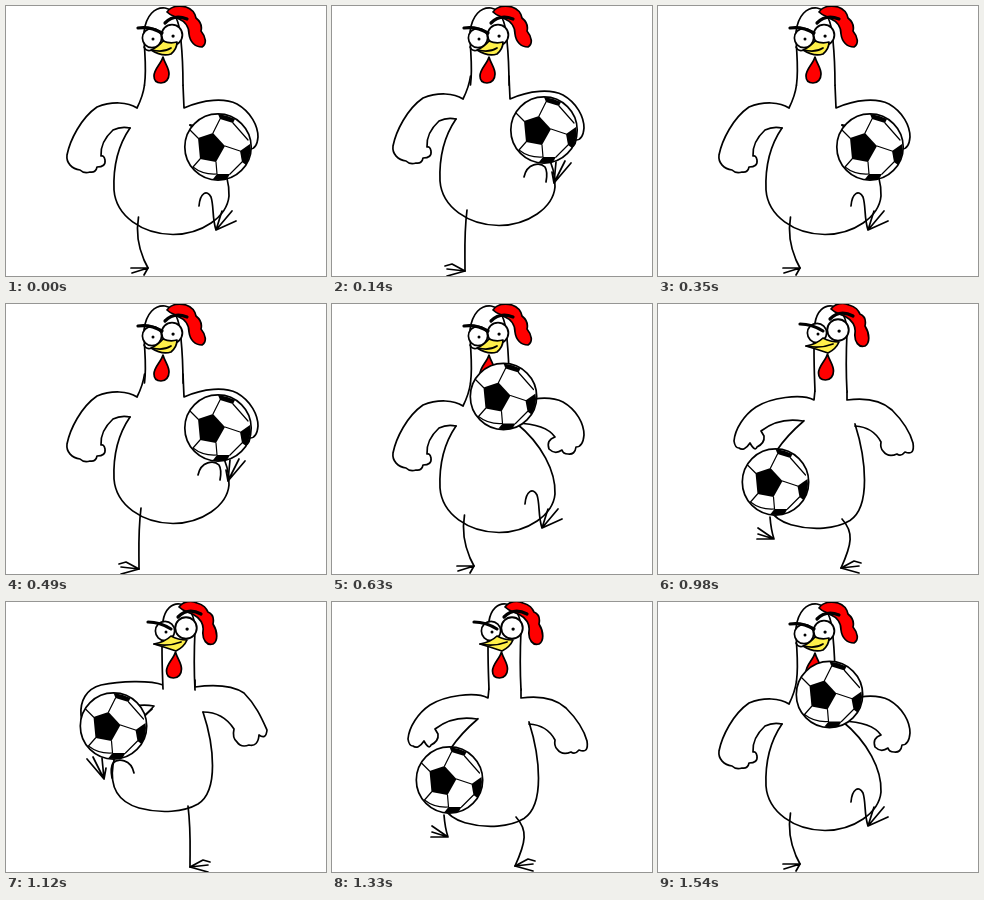
Animation, 320 px wide and 270 px high, one loop 1610 ms. Source, as an HTML page without scripts:

```html
<!DOCTYPE html>
<html lang="en">
<head>
<meta charset="utf-8">
<title>Chicken juggling a ball</title>
<style>
  html, body { margin: 0; width: 100%; height: 100%; overflow: hidden; background: #fff; }
  svg { display: block; width: 100vw; height: 100vh; }
  .ink { fill: none; stroke: #000; stroke-width: 1.7; stroke-linecap: round; stroke-linejoin: round; }
  .white { fill: #fff; }
  .red { fill: #f00; }
  .yellow { fill: #fff04a; }
  .brow { stroke-width: 3.2; }
  .seam { stroke-width: 1.2; }
  .dot { fill: #000; stroke: none; }
</style>
</head>
<body>
<svg viewBox="0 0 320 270">
  <defs>
    <g id="eye">
      <circle class="ink white" r="9.6"/>
      <circle class="dot" cx="1" cy="1" r="1.5"/>
    </g>
    <path id="wattle" class="ink red" d="M1 0C-1 7-8 12-8 19C-8 24-5 26 -1 26C4 26 7 22 7 17C7 11 3 7 1 0Z"/>

    <g id="headA" class="ink">
      <path class="white" d="M138.500 79C141 60 138 46 138 26C140 9 149 1 159 2C170 4 174 20 175 35C177 55 177 66 177 79"/>
      <path class="red" d="M161 6C165 0 173-1 180 1C186 3 189 7 190 12C195 16 196 21 195 25C200 31 201 38 196 41C189 41 184 36 183 28C183 20 178 15 173 13C169 10 165 10 161 6Z"/>
      <use href="#eye" x="146" y="32"/>
      <use href="#eye" transform="translate(166 29) scale(1.08)"/>
      <path class="brow" d="M132 22Q144 20 156 27M159 17Q168 8 181 13"/>
      <use href="#wattle" x="156" y="51"/>
      <path class="yellow" d="M145 44Q152 41 157 35Q164 38 171 36Q171 43 165 48Q156 51 145 44Z"/>
      <path d="M138 41Q140 46 146 44Q157 47 165 42"/>
    </g>
    <g id="bodyA" class="ink">
      <path d="M138.500 79Q137 90 131 102C122 96 106 95 91 101C75 112 64 134 61 149C60 157 66 163 74 164Q78 168 84 166Q90 167 91 161Q100 161 99 154Q98 149 95 150Q94 136 107 124Q115 120 124 122"/>
      <path d="M124 122C113 138 107 160 108 184C110 210 136 228 167 228.500C196 228 221 211 223 190C224 168 210 140 184 119"/>
      <path d="M177 79Q177.500 90 178 102C198 93 219 92 231 98C245 106 252 120 252 131Q251 143 244 143Q243 151 236 150Q231 150 230 146Q223 151 217 145Q214 136 223 133Q214 120 184 119"/>
    </g>

    <g id="headB" class="ink">
      <path class="white" d="M157 87C156 60 155 42 157 19C159 7 166 1 174 2C184 4 189 15 189 28C188 50 188 70 189 88"/>
      <path class="red" d="M173 5C177-1 186-2 191 1C198 3 200 6 202 10C207 12 208 17 207 22C212 30 212 39 207 42C201 44 196 38 197 29C198 22 194 16 188 13C183 10 178 10 173 5Z"/>
      <use href="#eye" x="159" y="29"/>
      <use href="#eye" transform="translate(180 26) scale(1.12)"/>
      <path class="brow" d="M142 20Q154 20 165 27M172 15Q182 5 195 12"/>
      <use href="#wattle" x="168.500" y="50"/>
      <path class="yellow" d="M148 42Q159 40 165 34Q172 38 181 38Q178 45 170 49Q158 45 148 42Z"/>
      <path d="M148 42Q162 45 175 40"/>
    </g>
    <g id="trunkB" class="ink">
      <path d="M146 116C124 134 110 152 107 172C103 198 116 210 133 215C155 221 178 219 192 211C213 198 208 152 197 119"/>
    </g>
    <g id="armsUp" class="ink">
      <path d="M157 86V92C144 87 114 88 95 92C80 96 74 108 75 122Q76 133 80 138Q88 142 93 133Q96 138 100 131Q120 108 148 113L136 126"/>
      <path d="M189 87V94C204 92 224 91 238 100C250 112 256 126 261 137Q260 147 253 142Q252 154 243 152Q235 155 231 149Q226 145 228 136Q217 119 197 119"/>
    </g>
    <g id="armsDown" class="ink">
      <path d="M157 86L156 96C143 89 112 94 98 103C86 111 77 125 76 137Q77 144 81 144Q86 148 92 139Q97 148 99 143Q107 139 106 132L103 127Q121 113 145 117"/>
      <path d="M189 87V96C204 94 222 95 234 106C246 118 252 128 255 139Q257 152 247 148Q243 153 239 150Q230 154 225 147Q222 144 223 138Q215 123 197 122"/>
    </g>

    <path id="toes" class="ink" d="M0 0L13-7L20-5M0 0L18-2M0 0L18 5"/>

    <g id="standA" class="ink">
      <path d="M132.500 211C130 226 132 240 138 254L142 262"/>
      <path d="M142 262L125 262M142 262L126 267M142 262L138 269"/>
    </g>
    <g id="standB" class="ink">
      <path d="M184 213C186 228 189 240 187 263"/>
      <use href="#toes" x="186" y="264"/>
    </g>
    <g id="bentB" class="ink">
      <path d="M184 215C196 228 194 240 183 264"/>
      <use href="#toes" x="183" y="264"/>
    </g>
    <g id="tallB" class="ink">
      <path d="M182 204C185 228 184 244 184 265"/>
      <use href="#toes" x="184" y="265"/>
    </g>
    <path id="lowLeg" class="ink" d="M112 213Q113 226 116 235M100 224L116 235L100 230M116 235L99 235"/>
    <path id="highLeg" class="ink" d="M128 171C125 157 112 156 107 161Q104 166 106 176M81 157L98 177L87 155M98 177L96 156M98 177L100 166"/>

    <g id="ball">
      <circle class="ink white" r="33.200" stroke-width="1.300"/>
      <path d="M-20-9L-5-14L7-1L-2 15L-18 12Z"/>
      <path d="M0-33Q9-32 17-28L15-24L2-28Z"/>
      <path d="M22 4L32-3Q34 7 28 18L24 15Z"/>
      <path d="M-5 32L-1 27L12 27L9 32Q2 34-5 32Z"/>
      <path class="ink seam" d="M-5-14L2-28M-20-9L-28-17M-18 12L-25 20M-2 15L-1 27M7-1L22 4M15-24L30-7M24 15L12 27M-25 20Q-15 28-1 27"/>
    </g>

    <!-- poses: a/b = facing side, then rest, Low, High -->
    <g id="a">
      <use href="#bodyA"/><use href="#headA"/><use href="#standA"/>
      <path class="ink" d="M193 200C194 187 201 183 205 191C208 200 206 212 210 224M216 205L210 224L226 205M210 224L230 215"/>
    </g>
    <g id="aLow">
      <use href="#bodyA" transform="translate(0 -3) scale(1 1.03)"/><use href="#headA"/>
      <use href="#bentB" transform="translate(317) scale(-1 1)"/>
      <use href="#lowLeg" transform="translate(320) scale(-1 1)"/>
    </g>
    <g id="aHigh">
      <use href="#bodyA" y="-9"/><use href="#headA"/>
      <use href="#tallB" transform="translate(317) scale(-1 1)"/>
      <use href="#highLeg" transform="translate(320) scale(-1 1)"/>
    </g>
    <g id="b">
      <use href="#trunkB"/><use href="#armsUp"/><use href="#headB"/><use href="#standB"/>
      <path class="ink" d="M119 196C111 192 103 196 103 206Q103 216 106 226M89 219L106 226L91 226M106 226L103 231"/>
    </g>
    <g id="bLow">
      <use href="#trunkB" transform="translate(0 -5) scale(1 1.05)"/>
      <use href="#armsDown"/><use href="#headB"/>
      <use href="#bentB"/><use href="#lowLeg"/>
    </g>
    <g id="bHigh">
      <use href="#trunkB" y="-9"/><use href="#armsUp" y="-9"/><use href="#headB"/>
      <use href="#tallB"/><use href="#highLeg"/>
    </g>
  </defs>

  <!-- strip of poses, shifted one at a time onto the stage; 23 equal steps per loop -->
  <g>
    <use href="#a"/>
    <use href="#aLow" x="400"/>
    <use href="#aHigh" x="800"/>
    <use href="#b" x="1200"/>
    <use href="#bLow" x="1600"/>
    <use href="#bHigh" x="2000"/>
    <animateTransform attributeName="transform" type="translate" calcMode="discrete" dur="1.61s" repeatCount="indefinite"
      values="0;-400;-800;0;0;0;-400;-800;0;0;-1200;-1200;-1200;-1200;-1600;-1600;-2000;-1200;-1200;-1600;-2000;-1200;0"/>
  </g>
  <use href="#ball">
    <animateTransform attributeName="transform" type="translate" calcMode="discrete" dur="1.61s" repeatCount="indefinite"
      values="212 141;203 178;212 124;212 100;212 108;212 141;203 178;212 124;193 97;171.5 92.5;150 88;128 95;111.5 114.5;110 146;117.5 178;117.5 178;107.5 124;109 100;111 135;117.5 178;107.5 124;140 100;171.5 92.5"/>
  </use>
</svg>
</body>
</html>
```
